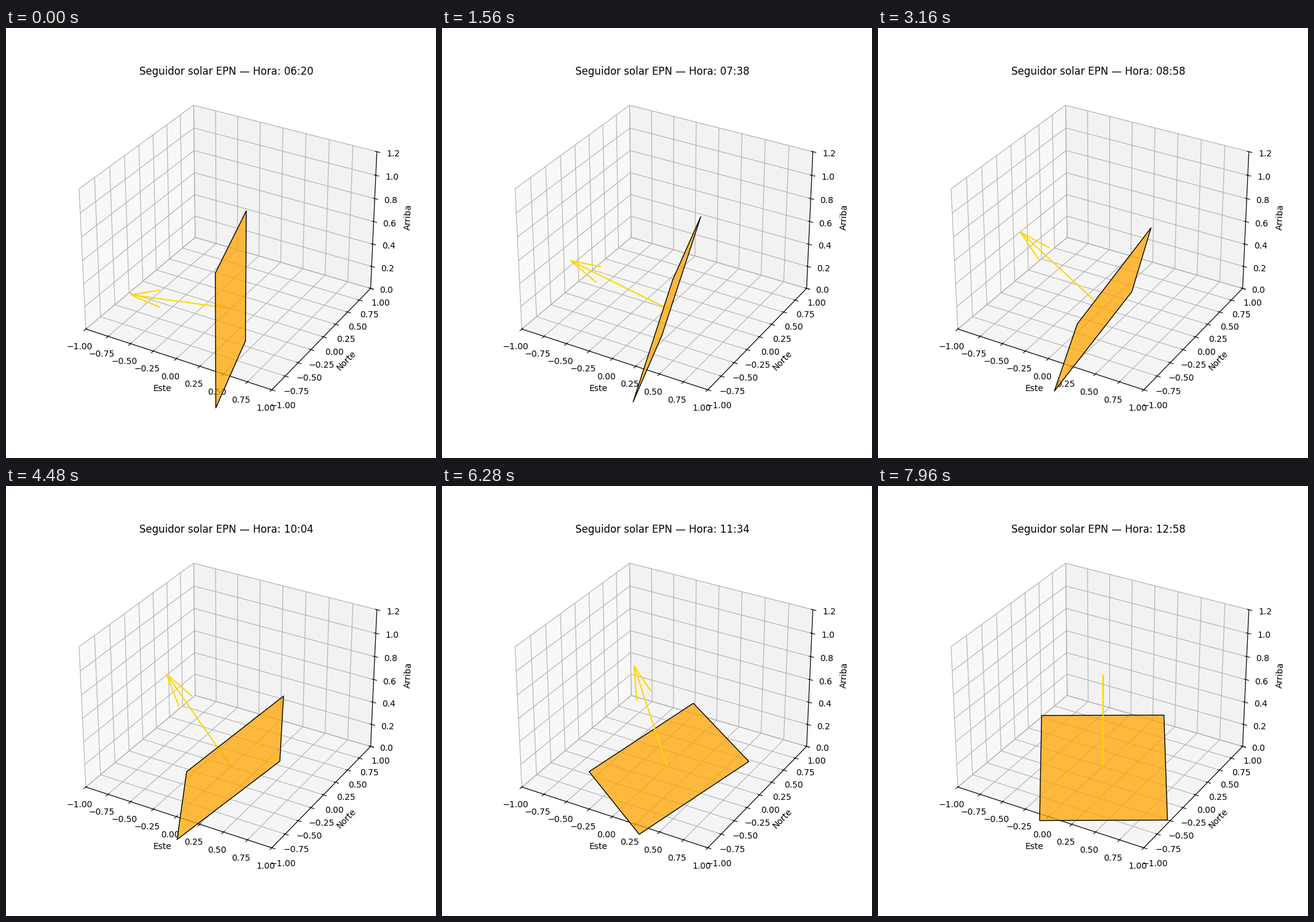
A matplotlib script for the animation above (8 s loop, 700x700 px).

```python
import numpy as np
import matplotlib.pyplot as plt
from matplotlib.animation import FuncAnimation
from mpl_toolkits.mplot3d.art3d import Poly3DCollection

FRAMES, INTERVAL = 200, 40
START, STEP = 6 * 60 + 20, 2          # minutes
NOON = 12 * 60 + 19.8                 # solar noon, minutes
LAT, DECL = np.radians(-0.21), np.radians(-16.0)
HALF = 0.6                            # half side of the panel


def sun_vector(minute):
    """Unit vector towards the sun for a clock time in minutes."""
    h = np.radians((minute - NOON) / 4)
    x = np.cos(DECL) * np.sin(h)
    y = np.sin(DECL) * np.cos(LAT) - np.cos(DECL) * np.sin(LAT) * np.cos(h)
    z = np.sin(DECL) * np.sin(LAT) + np.cos(DECL) * np.cos(LAT) * np.cos(h)
    return np.array([x, y, z])


def panel_corners(n):
    """Square centred on the origin, facing along n."""
    side = np.cross([0, 0, 1], n)
    side /= np.linalg.norm(side)
    up = np.cross(n, side)
    signs = [(-1, -1), (1, -1), (1, 1), (-1, 1)]
    return [HALF * (a * side + b * up) for a, b in signs]


fig = plt.figure(figsize=(7, 7), dpi=100)
ax = fig.add_subplot(111, projection="3d")
ax.set(xlim=(-1, 1), ylim=(-1, 1), zlim=(0, 1.2),
       xlabel="Este", ylabel="Norte", zlabel="Arriba")
title = ax.set_title("")

panel = Poly3DCollection([panel_corners(sun_vector(START))],
                         facecolor="orange", edgecolor="k", alpha=0.75)
ax.add_collection3d(panel)
arrow = None


def update(i):
    global arrow
    minute = START + STEP * i
    n = sun_vector(minute)
    panel.set_verts([panel_corners(n)])
    if arrow is not None:
        arrow.remove()
    arrow = ax.quiver(0, 0, 0, *n, color="gold", linewidth=1.5)
    title.set_text(f"Seguidor solar EPN — Hora: {minute // 60:02d}:{minute % 60:02d}")
    return panel, arrow, title


anim = FuncAnimation(fig, update, frames=FRAMES, interval=INTERVAL,
                     repeat=True, repeat_delay=0, blit=False)
plt.show()
```
